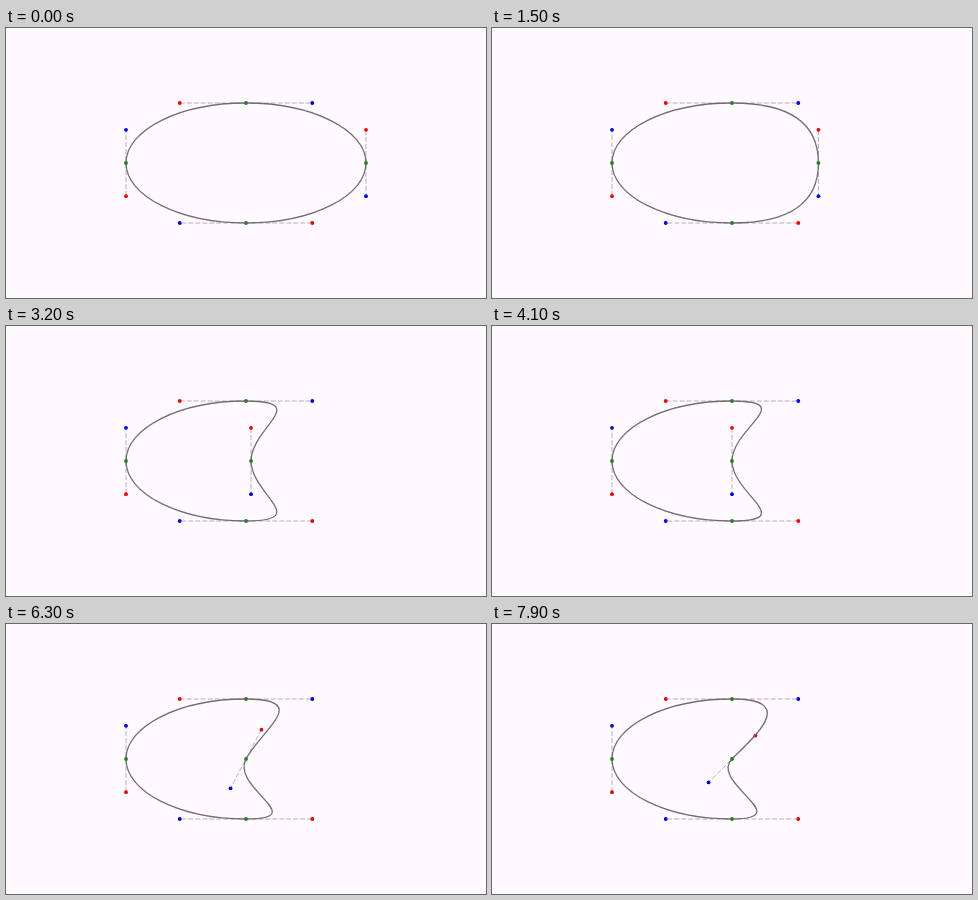
Recreate the animation shown at these times as an HTML page with a canvas. Size 480x270 px, loop 8 s.

```html
<!DOCTYPE html>
<html>
<head>
<meta charset="utf-8">
<style>
html, body { margin: 0; width: 100%; height: 100%; overflow: hidden; background: #fffaff; }
canvas { display: block; }
</style>
</head>
<body>
<canvas width="480" height="270"></canvas>
<script>
const ctx = document.querySelector('canvas').getContext('2d');
const LOOP = 8000, STEP = 100, MOVE = 4000;
const CX = 240, CY = 135, RX = 120, RY = 60;
const K = 0.5523; // handle length for a quarter ellipse

function ease(u) {
  u = Math.min(1, Math.max(0, u));
  return u - Math.sin(2 * Math.PI * u) / (2 * Math.PI);
}

// Anchor with an incoming (red) and outgoing (blue) handle on opposite sides
const node = (x, y, dx, dy) => ({ p: [x, y], a: [x - dx, y - dy], b: [x + dx, y + dy] });

function dot([x, y], color) {
  ctx.fillStyle = color;
  ctx.beginPath();
  ctx.arc(x, y, 1.9, 0, 2 * Math.PI);
  ctx.fill();
}

function draw(t) {
  const shift = RX * ease((t + 40) / MOVE);
  const turn = Math.PI / 4 * ease((t - 4060) / MOVE);
  const hx = RX * K, hy = RY * K;
  const nodes = [
    node(CX, CY - RY, hx, 0),
    node(CX + RX - shift, CY, -hy * Math.sin(turn), hy * Math.cos(turn)),
    node(CX, CY + RY, -hx, 0),
    node(CX - RX, CY, 0, -hy)
  ];

  ctx.fillStyle = '#fffaff';
  ctx.fillRect(0, 0, 480, 270);

  ctx.strokeStyle = '#b4b0b4';
  ctx.lineWidth = 1;
  ctx.setLineDash([5, 2]);
  for (const { a, b } of nodes) {
    ctx.beginPath();
    ctx.moveTo(...a);
    ctx.lineTo(...b);
    ctx.stroke();
  }
  ctx.setLineDash([]);

  for (const { p, a, b } of nodes) {
    dot(a, '#e80000');
    dot(b, '#0000d8');
    dot(p, '#008a00');
  }

  ctx.strokeStyle = 'rgba(100, 96, 100, 0.9)';
  ctx.lineWidth = 1.3;
  ctx.beginPath();
  ctx.moveTo(...nodes[0].p);
  nodes.forEach((n, i) => {
    const next = nodes[(i + 1) % nodes.length];
    ctx.bezierCurveTo(...n.b, ...next.a, ...next.p);
  });
  ctx.closePath();
  ctx.stroke();
}

const start = performance.now();
function tick() {
  const t = (performance.now() - start) % LOOP;
  draw(Math.floor(t / STEP) * STEP);
  requestAnimationFrame(tick);
}
tick();
</script>
</body>
</html>
```
